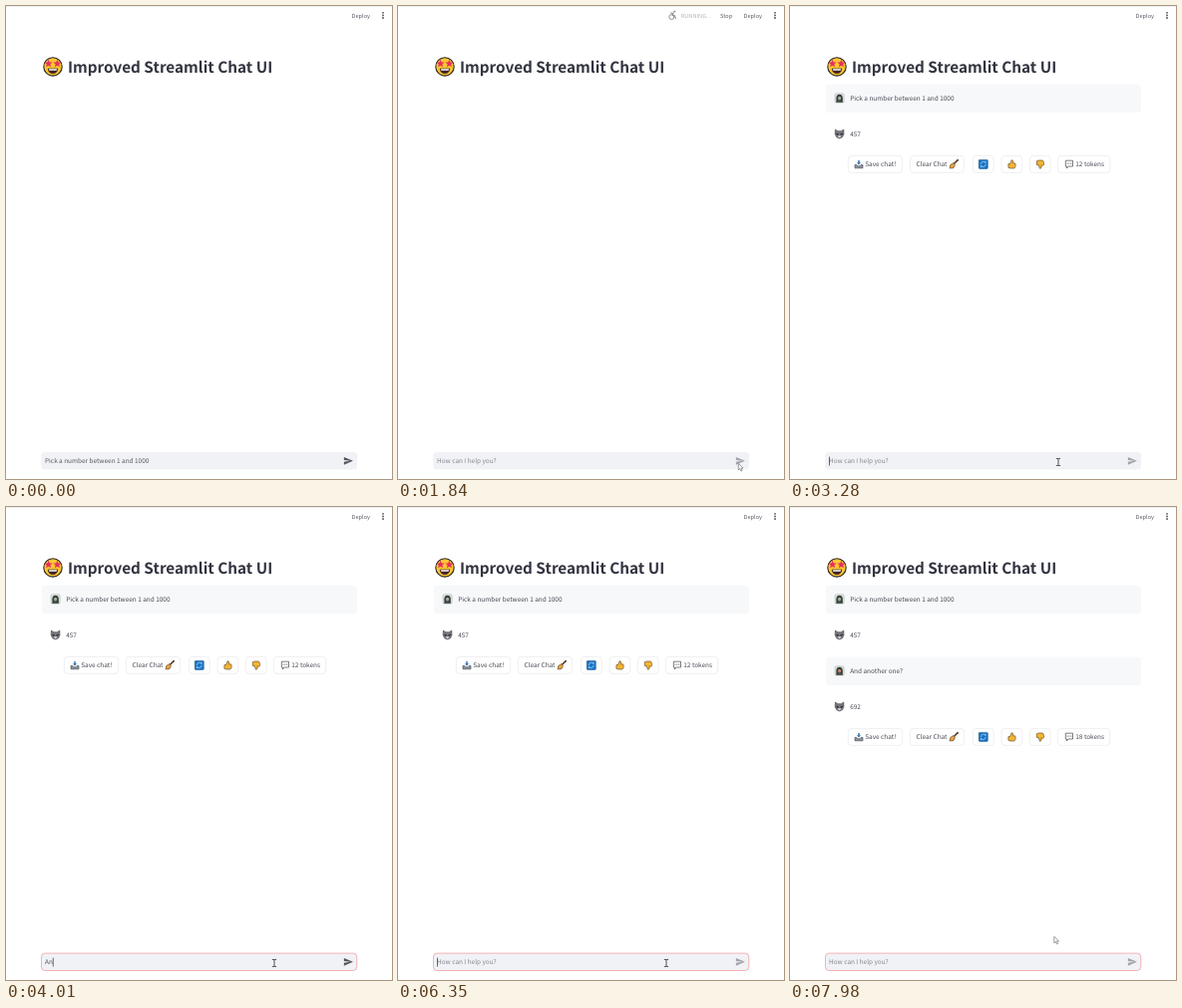
Recreate the animation shown at these times as an HTML page. Size 387 by 475 pixels, loop 8000 ms.

```html
<!DOCTYPE html>
<html lang="en">
<head>
<meta charset="utf-8">
<title>Chat UI</title>
<style>
  html, body { margin: 0; width: 100%; height: 100%; overflow: hidden; background: #fff; }
  svg { display: block; width: 387px; height: 475px; }
  text {
    font: 6.45px "Noto Sans CJK JP", "Noto Sans CJK SC", "Noto Sans CJK", "Open Sans", sans-serif;
    fill: #484a54; white-space: pre; text-rendering: geometricPrecision;
  }
  .small { font-size: 5.64px; fill: #565862; }
  .title { font-size: 15.31px; font-weight: 700; fill: #31333f; }
  .faint { fill: #b3b4b9; }
  .line { fill: none; stroke-linecap: round; stroke-linejoin: round; }
  .button { fill: #fff; stroke: #e3e4e7; stroke-width: .6; }
</style>
</head>
<body>
<svg viewBox="0 0 387 475">
  <defs>
    <path id="star" d="M0-4 1.2-1.3 4-1.1 1.8.7 2.5 3.5 0 2-2.5 3.5-1.8.7-4-1.1-1.2-1.3z"/>
    <path id="thumb" d="M-3.7-.4h1.7L-.5-4.2c1.4-.3 1.9 1 1.3 3h2c1.3 0 1 4.8-.7 5.2H-1.5l-2.2-.7z"
      fill="#f3b335" stroke="#51401f" stroke-width=".6"/>
    <g id="person">
      <rect x="45" y="87.8" width="9.2" height="9.4" rx="1.6" fill="#dde3de" stroke="#9ba39e" stroke-width=".4"/>
      <path d="M46.4 96.8v-4.6c0-4.6 6.4-4.6 6.4 0v4.6z" fill="#343d38"/>
      <ellipse cx="49.6" cy="92.6" rx="1.6" ry="1.9" fill="currentColor"/>
      <path d="M46.2 97c.4-2.4 6.4-2.4 6.8 0z" fill="#4d5e53"/>
    </g>
    <g id="cat">
      <path d="M45.4 124l2.5 1.7h3.4l2.5-1.7.2 4.8-1.6 3-2.8 1.2-2.8-1.2-1.6-3z" fill="#7a7b82" stroke="#3c3d43" stroke-width=".6"/>
      <path d="M46.3 127.4l2.6.9-.6 1.6-1.7-.7zM52.9 127.4l-2.6.9.6 1.6 1.7-.7z" fill="#2f3036"/>
      <path d="M47.6 130.6h4l-2 1.7z" fill="#f2f2f4"/>
    </g>
  </defs>

  <rect width="387" height="475" fill="#fff"/>
  <rect width="387" height="1" fill="#eeeff1"/>

  <g id="status">
    <g class="line" stroke="#85868d" stroke-width=".9">
      <g id="wheel">
        <circle cx="274.3" cy="11" r="2.5"/>
        <path d="M276.4 6.6l-1.6 2.8h2.7l1 3.4M275.8 7.4l-2.4-.5"/>
        <circle cx="277.2" cy="5.4" r=".5"/>
      </g>
      <g id="runner">
        <path d="M275.4 7.2l-1.3 3 2 1.2-.2 2.5M274.1 10.2l-.7 1.7-2 .5M275.4 7.2l-2.1.4-.8 1.5M275.5 7.4l1.2 1.5 1.5.2"/>
        <circle cx="276.2" cy="5.4" r=".5"/>
      </g>
      <g id="swimmer">
        <path d="M271.5 11.8q1.2-1 2.3 0t2.3 0 2.3 0M271.5 13.6q1.2-1 2.3 0t2.3 0 2.3 0M272.5 10l2.4-1.6-1.8-1.7 2.6-1"/>
        <circle cx="277.2" cy="8.6" r=".7"/>
      </g>
    </g>
    <text class="small faint" x="283.7" y="11.6">RUNNING...</text>
    <text class="small" x="323" y="11.6">Stop</text>
  </g>
  <text class="small" x="346.6" y="11.6">Deploy</text>
  <g fill="#4b4d57">
    <circle cx="378" cy="6.8" r=".9"/><circle cx="378" cy="9.4" r=".9"/><circle cx="378" cy="12" r=".9"/>
  </g>

  <circle cx="47" cy="60.9" r="9.2" fill="#fbc632" stroke="#2d2522" stroke-width="1.1"/>
  <path d="M42.2 62.9h9.6c0 6.4-9.6 6.4-9.6 0z" fill="#4a2426" stroke="#2d2522" stroke-width=".6"/>
  <path d="M42.9 63.3h8.2l-.5 1.5h-7.2z" fill="#fff"/>
  <g fill="#e62e5c">
    <use href="#star" x="42.6" y="57.7"/><use href="#star" x="51.4" y="57.7"/>
  </g>
  <text class="title" x="61.9" y="67">Improved Streamlit Chat UI</text>

  <g id="ask1">
    <rect x="35.7" y="78.7" width="316.3" height="28.3" rx="3.6" fill="#f7f8fa"/>
    <use href="#person" color="#a3aa9f"/>
    <text x="60.2" y="95.1">Pick a number between 1 and 1000</text>
  </g>
  <use id="bot1" href="#cat"/>
  <text id="reply1" x="60.2" y="131.1">457</text>

  <g id="ask2">
    <rect x="35.7" y="150.7" width="316.3" height="28.3" rx="3.6" fill="#f7f8fa"/>
    <use href="#person" y="72" color="#c08373"/>
    <text x="60.2" y="167.1">And another one?</text>
  </g>
  <use id="bot2" href="#cat" y="72"/>
  <text id="reply2" x="60.2" y="203.1">692</text>

  <g id="buttons">
    <g class="button">
      <rect x="58.3" y="150.4" width="54.4" height="17" rx="3.6"/>
      <rect x="120.4" y="150.4" width="54" height="17" rx="3.6"/>
      <rect x="183.4" y="150.4" width="20.8" height="17" rx="3.6"/>
      <rect x="212" y="150.4" width="20.8" height="17" rx="3.6"/>
      <rect x="240.4" y="150.4" width="20.8" height="17" rx="3.6"/>
      <rect x="268.4" y="150.4" width="52.4" height="17" rx="3.6"/>
    </g>
    <path d="M65 159.4h1.8l1 1.4h2.4l1-1.4H73v3.4h-8z" fill="#8d949e" stroke="#3b3f48" stroke-width=".6"/>
    <path d="M68.3 155h1.4v2.2H71l-2 2.2-2-2.2h1.3z" fill="#2f6fae"/>
    <text x="75.2" y="161.2">Save chat!</text>
    <text x="126.6" y="161.2">Clear Chat</text>
    <path class="line" d="M168.2 154.6l-4.4 4.4" stroke="#593729" stroke-width="1.5"/>
    <path d="M163.6 157.6l1.9 1.9-1.6 3.2-3.8.3.6-3.4z" fill="#e2a33a" stroke="#593729" stroke-width=".6"/>
    <rect x="189.3" y="154.4" width="9" height="9" rx=".8" fill="#1974c6" stroke="#154a7c" stroke-width=".5"/>
    <path class="line" d="M191.4 158.4c.4-2.4 3.5-2.8 4.6-.8v-1.5M196.2 159.4c-.4 2.4-3.5 2.8-4.6.8v1.5" stroke="#cfe5f8" stroke-width=".7"/>
    <use href="#thumb" transform="translate(222.6 159)"/>
    <use href="#thumb" transform="translate(251 159) scale(1 -1)"/>
    <path d="M276.3 155.2h7.2v5.8h-4.4l-1.7 2v-2h-1.1z" fill="#fff" stroke="#45474f" stroke-width=".7" stroke-linejoin="round"/>
    <path class="line" d="M278 158.1h.1M279.9 158.1h.1M281.8 158.1h.1" stroke="#45474f" stroke-width="1"/>
    <text id="tokens" x="286.3" y="161.2">12 tokens</text>
  </g>

  <rect x="35.3" y="448" width="316.7" height="17.6" rx="3.6" fill="#f0f2f6"/>
  <path id="hover" d="M333.4 448h15a3.6 3.6 0 0 1 3.6 3.6v10.4a3.6 3.6 0 0 1-3.6 3.6h-15z" fill="#ff4b4b"/>
  <rect id="focus" x="35.5" y="448.1" width="316.3" height="17.4" rx="3.6" fill="none" stroke="#f58f92" stroke-width=".65"/>
  <text id="field" x="39" y="459.2"></text>
  <rect id="caret" y="452.6" width=".7" height="9" fill="#31333f"/>
  <path id="send" transform="translate(338 451.7) scale(.43)" d="M2 21 23 12 2 3v7l15 2-15 2z"/>

  <path id="arrow" d="M0 0v6.4l1.5-1.3 1.1 2.5 1.2-.6-1.1-2.4h2z" fill="#fff" stroke="#5a5b61" stroke-width=".6"/>
  <path id="beam" class="line" d="M-1.7-3.5H-.4L0-3.1.4-3.5H1.7M0-3.1V3.1M-1.7 3.5H-.4L0 3.1.4 3.5H1.7" stroke="#26272c" stroke-width=".8"/>
</svg>

<script>
const LOOP = 8000;
const QUESTION = "Pick a number between 1 and 1000";
const FOLLOW_UP = "And another one?";
const KEY_TIMES = [3800, 4010, 4130, 4240, 4410, 4570, 4680, 4770,
                   4940, 4995, 5050, 5210, 5460, 5545, 5630, 5960];

const el = {};
document.querySelectorAll("svg > [id], #status [id], #tokens").forEach(e => el[e.id] = e);

const within = (t, a, b = LOOP) => t >= a && t < b;
const ramp = (t, a, b) => Math.min(1, Math.max(0, (t - a) / (b - a)));
const easeOut = p => 1 - (1 - p) ** 2;
const mix = (a, b, p) => a + (b - a) * p;
const show = (name, on) => { el[name].style.visibility = on ? "visible" : "hidden"; };
const fade = (name, v) => { el[name].style.opacity = v; };
const place = (name, x, y) => el[name].setAttribute("transform", `translate(${x} ${y})`);
const label = (name, s) => { if (el[name].textContent !== s) el[name].textContent = s; };

function drawStatus(t) {
  const first = ramp(t, 1600, 1800) * (1 - .88 * ramp(t, 2240, 2450));
  const second = ramp(t, 6420, 6600) * (1 - ramp(t, 7060, 7180));
  fade("status", t < 2890 ? first : second);
  const pose = t < 1990 ? "wheel" : t < 2070 ? "runner" : t < 2890 ? "swimmer"
    : t < 6680 ? "wheel" : t < 6960 ? "swimmer" : "runner";
  for (const p of ["wheel", "runner", "swimmer"]) el[p].style.display = p === pose ? "" : "none";
}

function drawChat(t) {
  show("ask1", t >= 1990);
  show("bot1", t >= 2070);
  show("reply1", t >= 2240);
  show("ask2", t >= 6580);
  show("bot2", t >= 6790);
  show("reply2", t >= 6960);
  show("buttons", within(t, 2300, 6580) || t >= 6960);
  place("buttons", 0, t < 6580 ? 0 : 72);
  label("tokens", t < 6580 ? "12 tokens" : "18 tokens");
}

function drawInput(t) {
  const count = t < 6350 ? KEY_TIMES.filter(k => k <= t).length : 0;
  const typed = t < 1430 ? QUESTION : FOLLOW_UP.slice(0, count);
  label("field", typed || "How can I help you?");
  el.field.style.fill = typed ? "#555761" : "#858790";

  const hover = ramp(t, 170, 290) * (1 - ramp(t, 1430, 1530));
  fade("hover", hover);
  const ready = t < 1430 || within(t, 3850, 6350);
  el.send.style.fill = hover > .5 ? "#fff" : ready ? "#51535d" : "#a0a3ac";

  fade("focus", ramp(t, 3280, 3490));
  show("caret", within(t, 3280, 6510) || within(t, 7040, 7570));
  el.caret.setAttribute("x", 39 + (typed ? el.field.getComputedTextLength() : 0));
}

function drawPointer(t) {
  const leaving = t >= 7900;
  show("arrow", t < 2890 || leaving);
  show("beam", within(t, 2890, 7900));
  if (leaving) {
    const p = ramp(t, 7880, 7980);
    place("arrow", mix(268, 264.8, p), mix(452, 431.3, p));
  } else {
    const p = easeOut(ramp(t, 30, 450));
    place("arrow", mix(346, 341.3, p), mix(477, 459.5, p));
  }
  const q = easeOut(ramp(t, 2870, 3080));
  place("beam", mix(341, 269, q), mix(462, 458, q));
}

const start = performance.now();
function frame() {
  const t = Math.max(0, performance.now() - start) % LOOP;
  drawStatus(t);
  drawChat(t);
  drawInput(t);
  drawPointer(t);
  requestAnimationFrame(frame);
}
frame();
</script>
</body>
</html>
```
